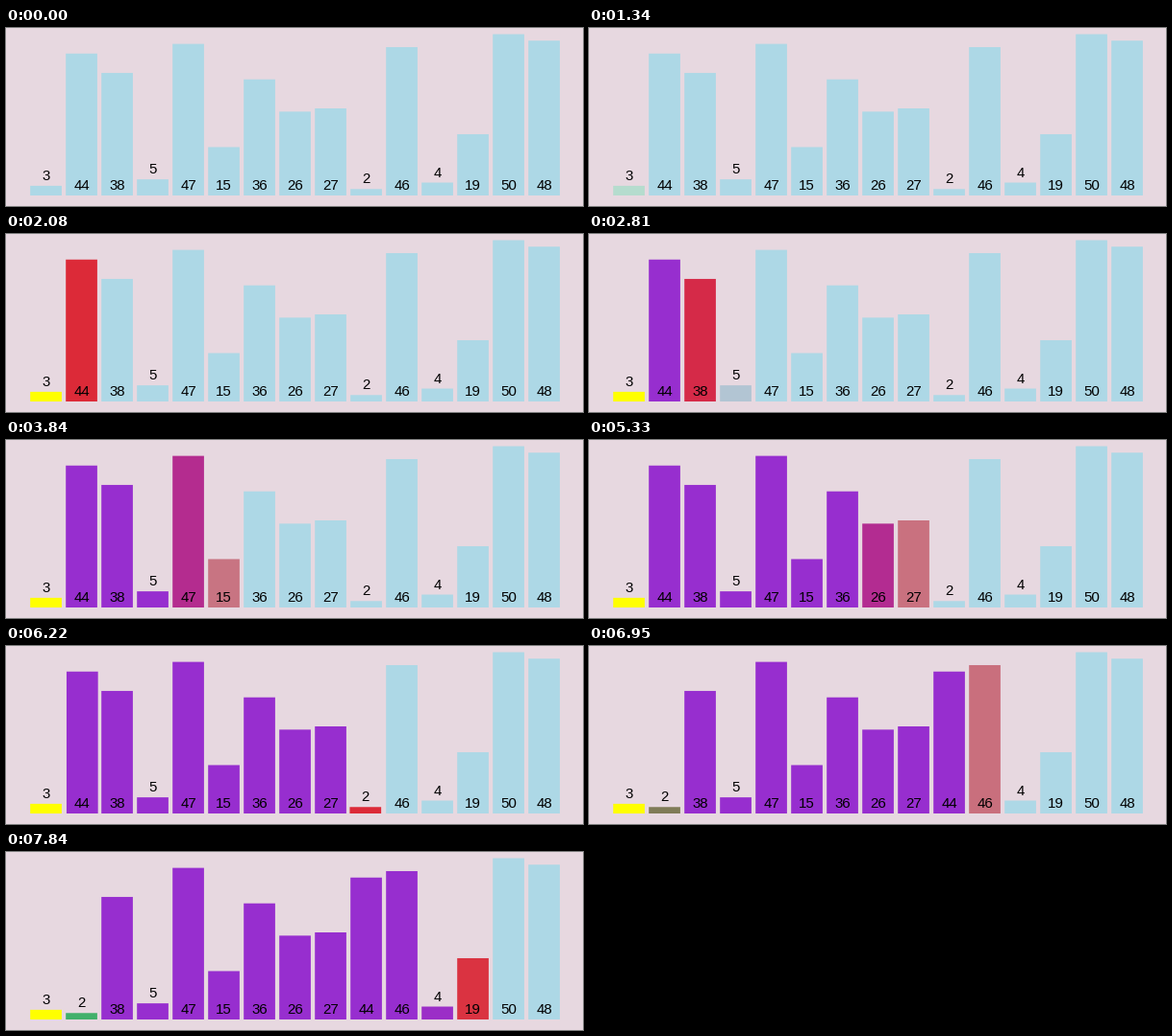
Animation of 600x186 px, one loop 7.99 s. Source, as a matplotlib script:

```python
import numpy as np
import matplotlib.pyplot as plt
from matplotlib.animation import FuncAnimation
from matplotlib.colors import to_rgb
from matplotlib.patches import Rectangle

WIDTH, HEIGHT, DPI = 600, 186, 100
FRAMES, INTERVAL = 170, 47
TICK = 148                       # the picture refreshes only this often, ms
FIRST_STEP, STEP, FADE = 1267, 493, 220

VALUES = [3, 44, 38, 5, 47, 15, 36, 26, 27, 2, 46, 4, 19, 50, 48]
LEFT, STRIDE, BAR_WIDTH, BASE, UNIT = 25.2, 37, 32.7, 175, 3.37

BACKGROUND = "#e7d8e0"
IDLE, PIVOT, CURRENT = "#add8e6", "#ffff00", "#dc2a38"
LARGER, SMALLER = "#972ecf", "#41b06b"


def partition_steps(values):
    """Quicksort partition around the first value, one list of actions per step."""
    order = list(range(len(values)))
    steps = [[("color", 0, PIVOT)]]
    pending, store = [], 0
    for slot in range(1, len(values)):
        bar = order[slot]
        steps.append(pending + [("color", bar, CURRENT)])
        if values[bar] < values[0]:
            store += 1
            other = order[store]
            steps.append([("move", bar, store), ("move", other, slot)])
            order[store], order[slot] = bar, other
            pending = [("color", bar, SMALLER)]
        else:
            pending = [("color", bar, LARGER)]
    return steps


def ease(u):
    u = min(max(u, 0), 1)
    return 4 * u**3 if u < 0.5 else 1 - 4 * (1 - u)**3


def state_at(time):
    slots = np.arange(len(VALUES), dtype=float)
    colors = np.array([to_rgb(IDLE)] * len(VALUES))
    for number, actions in enumerate(STEPS):
        amount = ease((time - FIRST_STEP - number * STEP) / FADE)
        for kind, bar, goal in actions:
            if kind == "color":
                colors[bar] += amount * (np.array(to_rgb(goal)) - colors[bar])
            else:
                slots[bar] += amount * (goal - slots[bar])
    return slots, colors


STEPS = partition_steps(VALUES)

fig = plt.figure(figsize=(WIDTH / DPI, HEIGHT / DPI), dpi=DPI, facecolor=BACKGROUND)
ax = fig.add_axes([0, 0, 1, 1])
ax.set(xlim=(0, WIDTH), ylim=(HEIGHT, 0))
ax.axis("off")

bars, labels = [], []
for value in VALUES:
    top = BASE - value * UNIT
    bars.append(ax.add_patch(Rectangle((0, top), BAR_WIDTH, value * UNIT,
                                       linewidth=0, snap=False)))
    baseline = top - 6 if value < 10 else 169
    labels.append(ax.text(0, baseline, str(value), ha="center", va="baseline",
                          family="Liberation Sans", size=15 * 72 / DPI,
                          color="black", zorder=3))


def update(frame):
    now = frame * INTERVAL + INTERVAL - 1
    slots, colors = state_at(now // TICK * TICK)
    for bar, label, slot, color in zip(bars, labels, slots, colors):
        x = LEFT + STRIDE * slot
        bar.set_x(x)
        bar.set_facecolor(color)
        label.set_x(x + BAR_WIDTH / 2)
    return bars + labels


anim = FuncAnimation(fig, update, frames=FRAMES, interval=INTERVAL,
                     repeat=True, repeat_delay=0)
plt.show()
```
